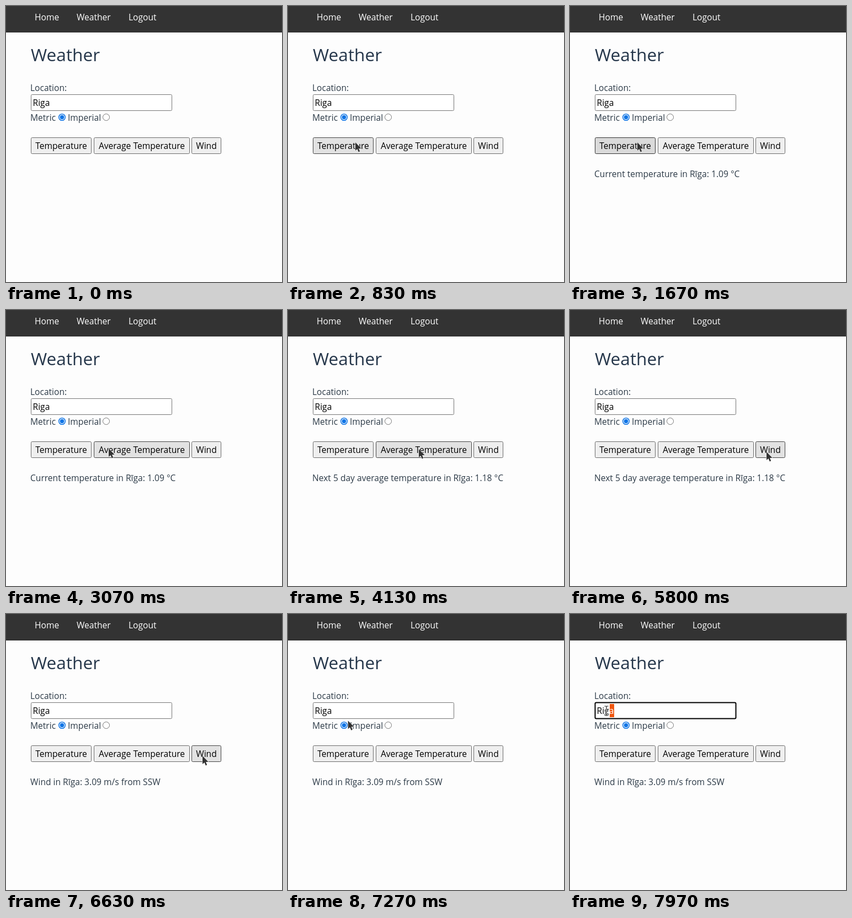
An HTML page for the animation above (8000 ms loop, 500 by 500 pixels).

```html
<!DOCTYPE html>
<html lang="en">
<head>
<meta charset="utf-8">
<title>Weather</title>
<style>
  html, body { margin: 0; width: 100%; height: 100%; overflow: hidden; background: #fdfdfd; }
  svg { display: block; width: 100%; height: 100%; }
  text { font: 15.6px "Open Sans", "Noto Sans", sans-serif; fill: #2c3a47; }
  .nav text { fill: #fff; }
  .title { font-size: 31.6px; fill: #25364a; }
  .dark { fill: #000; }
  .button rect { fill: #efefef; stroke: #6b6b6b; }
  .button text { fill: #000; }
  .button.hover rect { fill: #e2e2e2; stroke: #444; }
  .button.pressed rect { fill: #dadada; stroke: #333; }
</style>
</head>
<body>
<svg viewBox="0 0 500 500">
  <rect width="500" height="500" fill="#fdfdfd"/>
  <rect width="500" height="48" fill="#333"/>
  <g class="nav">
    <text x="52" y="26">Home</text>
    <text x="128" y="26">Weather</text>
    <text x="222" y="26">Logout</text>
  </g>
  <text class="title" x="45" y="100">Weather</text>
  <text x="44" y="154">Location:</text>

  <rect id="field" x="45.5" y="160.5" width="255" height="29" rx="2" fill="#fff"/>
  <rect id="selection" x="72" y="163" width="8" height="24" fill="#f0560f"/>
  <text class="dark" x="48.5" y="181">Rig<tspan id="lastLetter">a</tspan></text>

  <text x="44" y="208">Metric</text>
  <circle cx="101.5" cy="201.5" r="5.8" fill="#fff" stroke="#0f75e6" stroke-width="1.5"/>
  <circle cx="101.5" cy="201.5" r="3.8" fill="#0f75e6"/>
  <text x="112" y="208">Imperial</text>
  <circle cx="181.5" cy="201.5" r="6" fill="#fff" stroke="#767676"/>

  <g id="buttons"></g>
  <text id="result" x="44" y="310"></text>

  <path id="arrow" d="M0 0V15L3.4 12L5.8 17.4L8.2 16.3L6 11H10.7Z"
        fill="#333" stroke="#fff" stroke-width="1" paint-order="stroke"/>
  <g id="beam" fill="none">
    <path d="M-3.5-8H-1Q0-8 0-6V6Q0 8-1 8H-3.5M3.5-8H1Q0-8 0-6M0 6Q0 8 1 8H3.5" stroke="#fff" stroke-width="3"/>
    <path d="M-3.5-8H-1Q0-8 0-6V6Q0 8-1 8H-3.5M3.5-8H1Q0-8 0-6M0 6Q0 8 1 8H3.5" stroke="#222" stroke-width="1.2"/>
  </g>
</svg>
<script>
const LOOP = 8000;
const byId = id => document.getElementById(id);

const buttons = [
  { label: "Temperature", x: 45, width: 110, press: [1500, 1720] },
  { label: "Average Temperature", x: 159, width: 174, press: [3740, 3860] },
  { label: "Wind", x: 336, width: 54, press: [5960, 6080] },
];

const results = [
  [0, ""],
  [1300, "Current temperature in Rīga: 1.09 °C"],
  [3950, "Next 5 day average temperature in Rīga: 1.18 °C"],
  [6150, "Wind in Rīga: 3.09 m/s from SSW"],
];

// Pointer stops: time, x, y
const path = [
  [30, 370, -4], [830, 122, 247], [2770, 122, 247],
  [3070, 186, 251], [3500, 237, 252], [4970, 237, 252],
  [5270, 295, 251], [5740, 356, 257], [6630, 356, 257],
  [7370, 96, 190], [7560, 81, 175], [7700, 81, 175], [7960, 66, 175],
];
const FOCUS_TIME = 7650;

function pointerAt(time) {
  const next = path.findIndex(stop => stop[0] > time);
  if (next === 0) return path[0].slice(1);
  if (next < 0) return path[path.length - 1].slice(1);
  const [t0, x0, y0] = path[next - 1];
  const [t1, x1, y1] = path[next];
  const u = (time - t0) / (t1 - t0);
  const eased = u * u * (3 - 2 * u);
  return [x0 + (x1 - x0) * eased, y0 + (y1 - y0) * eased];
}

const inside = (x, y, left, top, width, height) =>
  x >= left && x <= left + width && y >= top && y <= top + height;

const show = (element, visible) =>
  element.setAttribute("visibility", visible ? "visible" : "hidden");

byId("buttons").innerHTML = buttons.map(({ label, x, width }) => `
  <g class="button">
    <rect x="${x + 0.5}" y="238.5" width="${width - 1}" height="29" rx="2"/>
    <text x="${x + width / 2}" y="259" text-anchor="middle">${label}</text>
  </g>`).join("");
const buttonNodes = [...byId("buttons").children];

function render(time) {
  const [x, y] = pointerAt(time);

  buttons.forEach((button, i) => {
    const hover = inside(x, y, button.x, 238, button.width, 30);
    const pressed = time >= button.press[0] && time < button.press[1];
    buttonNodes[i].classList.toggle("hover", hover);
    buttonNodes[i].classList.toggle("pressed", pressed);
  });

  byId("result").textContent = results.filter(([start]) => start <= time).pop()[1];

  const focused = time >= FOCUS_TIME;
  byId("field").setAttribute("stroke", focused ? "#000" : "#767676");
  byId("field").setAttribute("stroke-width", focused ? 2 : 1);

  const selected = focused && x < 75;
  show(byId("selection"), selected);
  byId("lastLetter").style.fill = selected ? "#fff" : "";

  const overField = inside(x, y, 45, 160, 256, 30);
  show(byId("arrow"), time >= 30 && !overField);
  show(byId("beam"), overField);
  const place = `translate(${x} ${y})`;
  byId("arrow").setAttribute("transform", place);
  byId("beam").setAttribute("transform", place);
}

function tick() {
  render(performance.now() % LOOP);
  requestAnimationFrame(tick);
}
tick();
</script>
</body>
</html>
```
